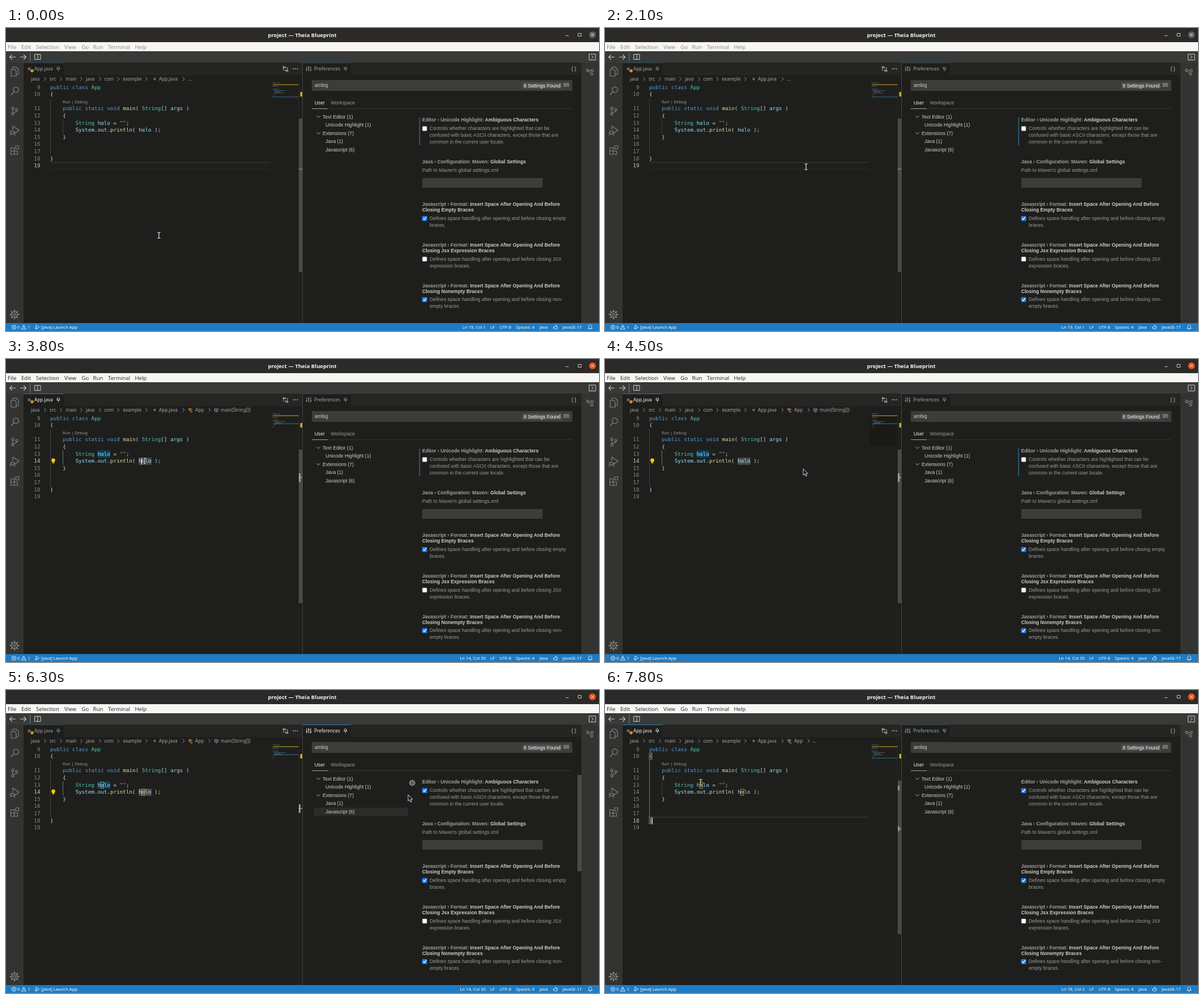
An HTML page that plays this animation: 1047 by 535 pixels, repeating every 8 s.

```html
<!DOCTYPE html>
<html lang="en">
<head>
<meta charset="utf-8">
<title>Editor and preferences</title>
<style>
html, body { margin: 0; width: 100%; height: 100%; overflow: hidden; background: #1e1f1c; }
svg { display: block; width: 1047px; height: 535px; }
text { white-space: pre; }
.ui { font-family: "Noto Sans", "Open Sans", sans-serif; }
.pref { font-family: "Liberation Sans", Arial, sans-serif; }
.code { font-family: "DejaVu Sans Mono", monospace; font-size: 9.27px; }
.line { fill: none; stroke-linecap: round; stroke-linejoin: round; }
</style>
</head>
<body>
<svg id="stage" viewBox="0 0 1047 535" xmlns="http://www.w3.org/2000/svg"></svg>
<script>
const LOOP = 8000, BG = '#1e1f1c', GREY = '#9a9b98', LIGHT = '#cdcdca';
const CLICK = 3400, CHECK = 5500, BACK = 6800;
const CH = 5.58, X0 = 78;

// Drawing helpers
const rect = (x, y, w, h, fill, extra = '') =>
  `<rect x="${x}" y="${y}" width="${w}" height="${h}" fill="${fill}" ${extra}/>`;
const text = (x, y, s, size, fill, cls = 'ui', extra = '') =>
  `<text x="${x}" y="${y}" font-size="${size}" fill="${fill}" class="${cls}" ${extra}>${s}</text>`;
const line = (d, stroke = GREY, w = 1, extra = '') =>
  `<path class="line" d="${d}" stroke="${stroke}" stroke-width="${w}" ${extra}/>`;
const ring = (x, y, r, stroke = GREY, w = 1) =>
  `<circle cx="${x}" cy="${y}" r="${r}" fill="none" stroke="${stroke}" stroke-width="${w}"/>`;
const dot = (x, y, r, fill) => `<circle cx="${x}" cy="${y}" r="${r}" fill="${fill}"/>`;
const group = (id, body) => `<g id="${id}">${body}</g>`;
const span = (fill, s) => `<tspan fill="${fill}">${s}</tspan>`;
const chevron = (x, y) => line(`M${x - 1.5} ${y - 3}l3 3l-3 3`, '#a0a09d', .9);
const pin = (x, y, c) => line(`M${x - 1.7} ${y - 3.5}h3.4v3.5h-3.4zM${x - 3} ${y}h6M${x} ${y}v3.5`, c, .75);

function gear(x, y, r, c) {
  let d = '';
  for (let i = 0; i < 8; i++) {
    const a = i * Math.PI / 4, cx = Math.cos(a), sy = Math.sin(a);
    d += `M${x + cx * r * .72} ${y + sy * r * .72}L${x + cx * r} ${y + sy * r}`;
  }
  return ring(x, y, r * .7, c, r * .17) + ring(x, y, r * .28, c, r * .15) + line(d, c, r * .27);
}

const palette = [
  [/^(public|class|static|void)$/, '#569cd6'],
  [/^(App|String)$/, '#4ec9b0'],
  [/^(main|println)$/, '#dcdcaa'],
  [/^""$/, '#ce9178'],
  [/^[a-zα]+$/i, '#9cdcfe'],
];
function code(x, y, s) {
  const body = s.replace(/""|[a-zα]+/gi, w => span(palette.find(p => p[0].test(w))[1], w));
  return text(x, y, body, 9.27, '#d4d4d4', 'code');
}

function titleBar() {
  let s = rect(0, 0, 1047, 25, '#2b2a28');
  s += text(523, 16, 'project — Theia Blueprint', 9.5, '#f4f3f1', 'ui', 'font-weight="700" text-anchor="middle"');
  s += line('M988.5 13.5h4.5', '#c9c8c5') + line('M1010.5 9.5h5v5h-5z', '#c9c8c5', 1);
  s += `<circle id="close" cx="1035.5" cy="12" r="6"/>` + line('M1033.5 10l4 4m0 -4l-4 4', '#f5f5f3', 1);
  s += rect(0, 25, 1047, 16, '#f7f6f4');
  const menu = [['File', 3], ['Edit', 27], ['Selection', 53], ['View', 103], ['Go', 133.5], ['Run', 153.5], ['Terminal', 180], ['Help', 227.5]];
  s += group('menu', menu.map(([m, x]) => `<text x="${x}" y="36.7" font-size="9.6" class="ui">${m}</text>`).join(''));
  s += rect(0, 41, 1047, 20, '#393a37');
  s += line('M16.5 51.3h-10m4 -4l-4 4l4 4M25.5 51.3h10m-4 -4l4 4l-4 4', '#d0d0cd', 1.1);
  s += line('M42.5 44v15', '#8c8c88', .8) + line('M51 46.5h10v9h-10zM56 46.5v9', '#cfcfcc', 1);
  return s + line('M1030 46h11v10.5h-11zM1034 48.7l3 2.6l-3 2.6', '#cfcfcc', 1);
}

function sideBars() {
  const c = '#858682';
  let s = rect(0, 61, 31, 460, '#333431') + rect(1016, 61, 31, 460, '#333431');
  s += line('M12 73v-4h6l4 4v9h-4M9 73h6l3 3v9h-9z', c, 1.1);
  s += ring(17.5, 109, 4.8, c, 1.2) + line('M14 112.5l-5 5.5', c, 1.2);
  s += ring(12, 141.5, 2, c, 1.1) + ring(12, 151.5, 2, c, 1.1) + ring(19, 144, 2, c, 1.1) + line('M12 143.5v6M19 146c0 3 -4 2 -6 4', c, 1.1);
  s += line('M12 180v-7l11 7.5l-8 5.5', c, 1.1) + ring(11.5, 185, 2.8, c, 1.1) + line('M7 182l2 1m-2.5 2.5h2m-2 3.5l2 -1m7.5 -5l-2 1m2.5 2h-2m2 3.5l-2 -1', c, .9);
  s += line('M8.5 211.5h6v11.5h-6zM8.5 217.2h12v5.8h-12zM17 208h5.5v5.5h-5.5z', c, 1.1);
  s += gear(15, 506, 7.6, c);
  s += ring(1027, 75, 2, c, 1.1) + ring(1035, 75, 2, c, 1.1) + ring(1034, 81, 2, c, 1.1);
  return s + line('M1029 75h4M1028.5 76.5l4 3.5M1025 72l2 1', c, 1);
}

function editor() {
  let s = rect(31, 61, 492, 22, '#252623') + rect(31, 61, 71, 22, BG) + rect(31, 61, 71, 1, '#25465c', 'id="tabA"');
  s += dot(41, 72, 2.6, '#8c5b4d') + dot(46, 75.5, 2.7, '#d9a52b') + line('M46 74v1.5', '#3a2c08', .7);
  s += group('nameA', text(50, 75.2, 'App.java', 8.2, 'currentColor') + pin(92.5, 72.5, 'currentColor'));
  s += line('M490 75v-5.5h4m-1.5 -1.5l1.5 1.5l-1.5 1.5M497 69.5v5.5h-4m1.5 -1.5l-1.5 1.5l1.5 1.5', '#c5c5c2', .9) + ring(490, 69, 1.2, '#c5c5c2', .8) + ring(497, 76, 1.2, '#c5c5c2', .8);
  s += [507.5, 511, 514.5].map(x => dot(x, 72, .9, '#c5c5c2')).join('');

  // breadcrumbs
  const crumbs = [['java', 44], ['src', 77], ['main', 105.5], ['java', 141], ['com', 173.5], ['example', 206.5], ['App.java', 270]];
  s += crumbs.map(([c, x]) => text(x, 93.2, c, 8.2, '#a5a6a2')).join('');
  s += [69, 97, 133, 166, 198.5, 248, 313.5].map(x => chevron(x, 90)).join('') + dot(262.5, 90, 2.2, '#8c5b4d');
  s += group('crumb0', text(321.5, 93.2, '…', 8.2, '#a5a6a2'));
  s += group('crumb1', line('M323 87.5h3v3h-3zM326 89h3M326 91v2.5h3', '#dd8f3d', 1.1) + text(334, 93.2, 'App', 8.2, '#a5a6a2') + chevron(359.5, 90));
  s += group('crumb2', line('M371.5 87l3 1.5v3.5l-3 1.5l-3 -1.5v-3.5zM368.5 88.5l3 1.5l3 -1.5M371.5 90v3.5', '#b4a0c4', .8) + text(379, 93.2, 'main(String[])', 8.2, '#a5a6a2'));
  s += group('crumb3', text(366.5, 93.2, '…', 8.2, '#a5a6a2'));

  // highlights behind the code
  s += group('current', rect(78, 0, 388, 1, '#3b3c39') + rect(78, 12, 388, 1, '#2c2d2a'));
  s += line('M78.5 123.5v101', '#454642', .9, 'id="guide0"') + line('M100.5 161.5v25', '#454642', .9, 'id="guide1"');
  s += rect(234, 174.2, 23, 12.5, '#27333c', 'id="wordHover"');
  s += group('words', rect(161.5, 161.7, 22.5, 12.5, '#0d4260') + rect(234, 174.2, 23, 12.5, '#4a4b48'));
  s += group('brackets', [111, 224.5].map(y => rect(78, y, 5, 12, '#1b3626', 'stroke="#888985" stroke-width=".8"')).join(''));
  const rows = [
    [9, 107.6, 0, 'public class App'], [10, 120.2, 0, '{'],
    [11, 145.4, 4, 'public static void main( String[] args )'], [12, 158, 4, '{'],
    [13, 170.6, 8, 'String hαlo = "";'], [14, 183.2, 8, 'System.out.println( hαlo );'],
    [15, 195.8, 4, '}'], [16, 208.4, 0, ''], [17, 221, 0, ''], [18, 233.6, 0, '}'], [19, 246.2, 0, ''],
  ];
  for (const [n, y, indent, src] of rows) {
    s += `<text id="n${n}" x="60.5" y="${y}" class="code" text-anchor="end">${n}</text>`;
    s += code(X0 + indent * CH, y, src);
  }
  s += text(100, 132.6, 'Run | Debug', 7.25, '#999a96');
  s += group('marks', rect(167, 162.5, 5.5, 11, 'none', 'stroke="#b8952f" stroke-width=".9"') + rect(239.5, 175, 5.5, 11, 'none', 'stroke="#b8952f" stroke-width=".9"'));
  s += group('bulb', dot(83.5, 178.8, 3.3, '#fc0') + rect(81.9, 181, 3.2, 2.5, '#fc0') + rect(82.1, 183.6, 2.8, 1.2, '#a88f45'));
  s += rect(0, 0, 1.2, 12, '#e6e6e3', 'id="caret"');

  // minimap and ruler
  s += rect(467, 97, 50, 55, 'rgba(0,0,0,.17)', 'id="slider"') + rect(471, 0, 46, 1.4, '#2b5872', 'id="mapLine"');
  s += rect(471, 99.5, 46, 1.3, '#a98c22');
  const map = [[471, 97, 12], [471, 103, 9], [471, 108, 10], [473, 110.5, 20], [475, 112.5, 10], [475, 114.5, 15], [473, 116.5, 2], [471, 120, 2]];
  s += map.map(([x, y, w]) => line(`M${x} ${y}h${w}`, '#55798c', .8, 'stroke-dasharray="2.5 1"')).join('');
  s += line('M516.8 97v424', '#2c2d2a', .8) + rect(519.5, 113, 3.5, 8, '#cda92e');
  s += rect(517, 160, 6, 271, '#4a4b48', 'id="scrollA"');
  s += group('rule0', rect(517, 248.5, 6, 1.3, '#8d8e8a'));
  s += group('rule1', rect(517, 202, 3, 15, '#9a9b97') + rect(517, 208.5, 6, 1.3, '#b0b0ac'));
  s += group('rule2', rect(517, 169, 3, 8, '#8d8e8a') + rect(517, 241, 3, 8, '#8d8e8a') + rect(517, 244.5, 6, 1.3, '#a4a5a1'));
  return s + rect(523, 61, 1, 460, '#444542');
}

const checkBox = (y, on) => on
  ? rect(734.7, y - 4.3, 8.9, 8.9, '#1f7ff0', 'rx="1.4"') + line(`M736.9 ${y + .2}l1.7 1.8l3 -4`, '#fff', 1.3)
  : rect(735.1, y - 3.9, 8.1, 8.1, '#fff', 'rx="1.4" stroke="#767676" stroke-width=".7"');
const para = (x, y, ...rows) => rows.map((r, i) => text(x, y + i * 11.9, r, 8.62, GREY, 'pref')).join('');
const heading = (y, path, name, rest = '') =>
  text(734.7, y, span('#a0a19d', path + ' ') + span(LIGHT, name), 8.6, LIGHT, 'pref', 'font-weight="700"') +
  (rest && text(734.7, y + 10, rest, 8.6, LIGHT, 'pref', 'font-weight="700"'));

function preferences() {
  let s = rect(524, 61, 492, 22, '#252623') + rect(524, 61, 85, 22, BG) + rect(524, 61, 85, 1, '#25465c', 'id="tabB"');
  s += group('nameB', line('M531 68v8M534.5 68v8M538 68v8M529.8 73.5h2.4M533.3 70h2.4M536.8 74h2.4', 'currentColor', .9) +
    text(544, 75.2, 'Preferences', 8.25, 'currentColor') + pin(599.5, 72.5, 'currentColor'));
  s += text(998.5, 75, '{ }', 8.5, '#c5c5c2', 'pref');
  s += rect(540, 92, 460, 19, '#3c3d3a') + text(545, 104.4, 'ambig', 8.62, '#cfcfcc', 'pref');
  s += rect(911.5, 96, 70, 11.5, '#4d4d4b') + text(914, 104.6, '8 Settings Found', 8.62, '#fff', 'pref');
  s += line('M984.5 98h9.5M984.5 100.5h9.5M984.5 103h5M991 103h3', '#c5c5c2', .9);
  s += text(544.7, 134.9, 'User', 8.55, '#f0f0ed', 'pref') + text(573.5, 134.9, 'Workspace', 8.5, GREY, 'pref');
  s += rect(540, 142, 460, 1, '#343532') + rect(540, 142, 28, 1, '#a5a6a2');
  s += rect(544, 207.7, 166, 14.3, '#2b2c2a', 'id="rowHover"');
  const tree = [['Text Editor (1)', 559], ['Unicode Highlight (1)', 564], ['Extensions (7)', 559], ['Java (1)', 564], ['Javascript (6)', 564]];
  tree.forEach(([label, x], i) => {
    const y = 156.5 + i * 14.6;
    s += text(x, y + 3, label, 8.62, LIGHT, 'pref');
    if (x < 560) s += line(`M548.5 ${y - 1.3}l3 3l3 -3`, '#c5c5c2', .9);
  });
  s += rect(726, 150, 274, 72, '#252623', 'id="itemHover"') + rect(729.5, 158, 1.6, 49, '#2f6485', 'id="bar"');
  s += group('gear', gear(717.3, 164, 5, '#c5c5c2'));
  s += heading(165.2, 'Editor › Unicode Highlight:', 'Ambiguous Characters');
  s += group('off', checkBox(177.5, false)) + group('on', checkBox(177.5, true));
  s += para(748, 180.2, 'Controls whether characters are highlighted that can be', 'confused with basic ASCII characters, except those that are', 'common in the current user locale.');
  s += heading(239.2, 'Java › Configuration: Maven:', 'Global Settings') + para(734.7, 253.7, "Path to Maven's global settings.xml") + rect(735, 265, 212.5, 17, '#3c3d3a');
  const format = (y, kind, on, a, b) =>
    heading(y, 'Javascript › Format:', 'Insert Space After Opening And Before', `Closing ${kind} Braces`) +
    checkBox(y + 22, on) + para(748, y + 24.8, 'Defines space handling after opening and before closing ' + a, b);
  s += format(314.2, 'Empty', true, 'empty', 'braces.');
  s += format(385.9, 'Jsx Expression', false, 'JSX', 'expression braces.');
  s += format(457.5, 'Nonempty', true, 'non-', 'empty braces.');
  return s + rect(1009, 150, 7, 170, '#4a4b48', 'id="scrollB"');
}

function statusBar() {
  const y = 531, c = '#fff', put = (x, s) => text(x, y, s, 7.65, c);
  let s = rect(0, 521, 1047, 14, '#1f7bc3');
  s += ring(14, 528.3, 3.7, c, .8) + line('M12.5 526.8l3 3m0 -3l-3 3M31.5 524.7l3.9 7h-7.8zM31.5 527v2.3', c, .8);
  s += put(20, '0') + put(38.5, '1') + line('M53 527v-2.5l5.5 3.7l-4 2.8', c, .8) + ring(53, 530, 1.5, c, .8) + put(62, '[java] Launch App');
  s += `<text id="pos" x="847" y="${y}" font-size="7.65" fill="#fff" class="ui" text-anchor="end"></text>`;
  s += put(855, 'LF') + put(871.5, 'UTF-8') + put(900, 'Spaces: 4') + put(942, 'Java') + put(982.5, 'JavaSE-17');
  s += line('M967 528h2l1.5 -3.5c1.5 0 1 2 .7 2.8h2.5l-.8 4h-4l-1.9 -.8z', c, .8);
  return s + line('M1028 530.5h7l-1 -1.5v-2.5c0 -3 -5 -3 -5 0v2.5zM1030.8 532h1.4', c, .8);
}

function overlay() {
  const tip = rect(234.5, 154.5, 258, 19, '#252623', 'stroke="#4a4b48" stroke-width="1"') +
    text(240, 167.3, span('#4ec9b0', 'String') + span('#9cdcfe', ' hαlo - com.example.App.main(String[])'), 9.27, '#d4d4d4', 'code');
  const beam = 'M-2.5 -5h5M0 -5v10M-2.5 5h5';
  return group('tip', tip) +
    group('beam', line(beam, '#111', 2.6) + line(beam, '#f4f4f2', 1.2)) +
    group('arrow', '<path d="M0 0v11l2.5 -2.3l1.9 4.3l2 -.9l-1.9 -4.1h3.5z" fill="#111" stroke="#eee" stroke-width=".9" stroke-linejoin="round"/>');
}

document.getElementById('stage').innerHTML =
  rect(0, 0, 1047, 535, BG) + editor() + preferences() + sideBars() + titleBar() + statusBar() + overlay();

// Motion
const path = [
  [0, 270, 366], [500, 270, 366], [700, 420, 300], [800, 560, 250], [1000, 745, 200], [1200, 782, 189],
  [1400, 930, 175], [1500, 946, 172], [1700, 820, 185], [1900, 640, 205], [2000, 470, 232], [2100, 355, 245],
  [2200, 355, 245], [2400, 262, 205], [2500, 233, 190], [2600, 239, 187], [2700, 239, 187], [2900, 245, 180],
  [4100, 245, 180], [4300, 270, 184], [4500, 350, 194], [4600, 560, 206], [4800, 690, 190], [5000, 710, 182],
  [5300, 738, 176], [5600, 739, 176], [5900, 946, 172], [6100, 860, 176], [6200, 770, 182], [6300, 710, 185],
  [6400, 560, 215], [6500, 436, 232], [6600, 436, 232], [6800, 330, 231], [7200, 240, 226], [7500, 177, 200],
  [7700, 169, 163], [8000, 169, 163],
];
const at = id => document.getElementById(id);
const set = (id, attrs) => { for (const k in attrs) at(id).setAttribute(k, attrs[k]); };
const show = (id, v) => set(id, { opacity: +v });
const ramp = (t, a, b) => Math.min(1, Math.max(0, (t - a) / (b - a)));
const within = (t, ...spans) => spans.some(([a, b]) => t >= a && t < b);

function pointer(t) {
  const i = Math.max(1, path.findIndex(p => p[0] >= t));
  const [ta, xa, ya] = path[i - 1], [tb, xb, yb] = path[i], k = ramp(t, ta, tb);
  return [xa + (xb - xa) * k, ya + (yb - ya) * k];
}

function render(time) {
  const t = Math.floor(time / 100) * 100;
  const live = t >= CLICK, checked = t >= CHECK, back = t >= BACK;
  const row = back ? 18 : live ? 14 : 19;

  set('close', { fill: live ? '#e95420' : '#62615e' });
  set('menu', { fill: live ? '#333331' : '#8e8d8a' });
  const onA = live && !checked || back, onB = checked && !back;
  set('tabA', { fill: onA ? '#2379b5' : '#25465c' });
  set('tabB', { fill: onB ? '#2379b5' : '#25465c' });
  set('nameA', { color: onA ? '#f4f4f1' : '#a2a39f' });
  set('nameB', { color: onB ? '#f4f4f1' : '#a2a39f' });

  show('crumb0', !live);
  show('crumb1', live);
  show('crumb2', live && !back);
  show('crumb3', back);
  for (let n = 9; n <= 19; n++) set('n' + n, { fill: n === row ? '#c9c9c5' : '#868782' });
  set('current', { transform: `translate(0 ${row === 18 ? 224 : 237})`, opacity: +(row !== 14) });
  set('guide0', { stroke: back ? '#777873' : '#454642' });
  set('guide1', { stroke: row === 14 ? '#777873' : '#454642' });
  show('wordHover', within(t, [2900, CLICK]));
  show('words', within(t, [3700, BACK]));
  show('bulb', within(t, [3800, BACK]));
  show('brackets', back);
  show('marks', t >= 5700);

  const blink = start => Math.floor((t - start) / 500) % 2 === 0;
  set('caret', row === 18 ? { x: 82.8, y: 225 } : { x: 238.9, y: 174.5 });
  show('caret', within(t, [3600, CHECK]) && blink(3600) || back && blink(BACK));

  show('slider', within(t, [700, 800], [1900, 2000], [4500, 4600]));
  set('mapLine', { y: row === 14 ? 113.5 : row === 18 ? 119.5 : 121 });
  show('rule0', !live);
  show('rule1', live && !back);
  show('rule2', back);
  show('scrollA', t < 1900 ? 1 - ramp(t, 800, 1250) : t < 4500 ? ramp(t, 1900, 2100) : t < 6000 ? 1 - ramp(t, 4600, 5050) : ramp(t, 6300, 6500));
  show('scrollB', t < 3000 ? ramp(t, 800, 1100) - ramp(t, 1200, 1400) : ramp(t, 4860, 5300) - ramp(t, 6300, 6500));

  const hover = within(t, [1000, 1800], [4900, 6300]);
  show('itemHover', hover);
  show('rowHover', within(t, [4600, 4700], [6300, 6400]));
  set('bar', { fill: hover ? '#34808f' : '#2f6485', opacity: +!checked });
  show('gear', within(t, [5000, 6400]) ? .2 + .8 * ramp(t, 5000, 5300) : 0);
  show('off', !checked);
  show('on', checked);
  at('pos').textContent = { 19: 'Ln 19, Col 1', 14: 'Ln 14, Col 30', 18: 'Ln 18, Col 2' }[row];

  show('tip', within(t, [3000, CLICK]) ? ramp(t, 2900, 3100) : 0);
  const [x, y] = pointer(t), arrow = within(t, [800, 2000], [4500, 6500]);
  for (const id of ['beam', 'arrow']) set(id, { transform: `translate(${x} ${y})` });
  show('arrow', arrow);
  show('beam', !arrow);
}

const start = performance.now();
function tick() {
  render((performance.now() - start) % LOOP);
  requestAnimationFrame(tick);
}
tick();
</script>
</body>
</html>
```
